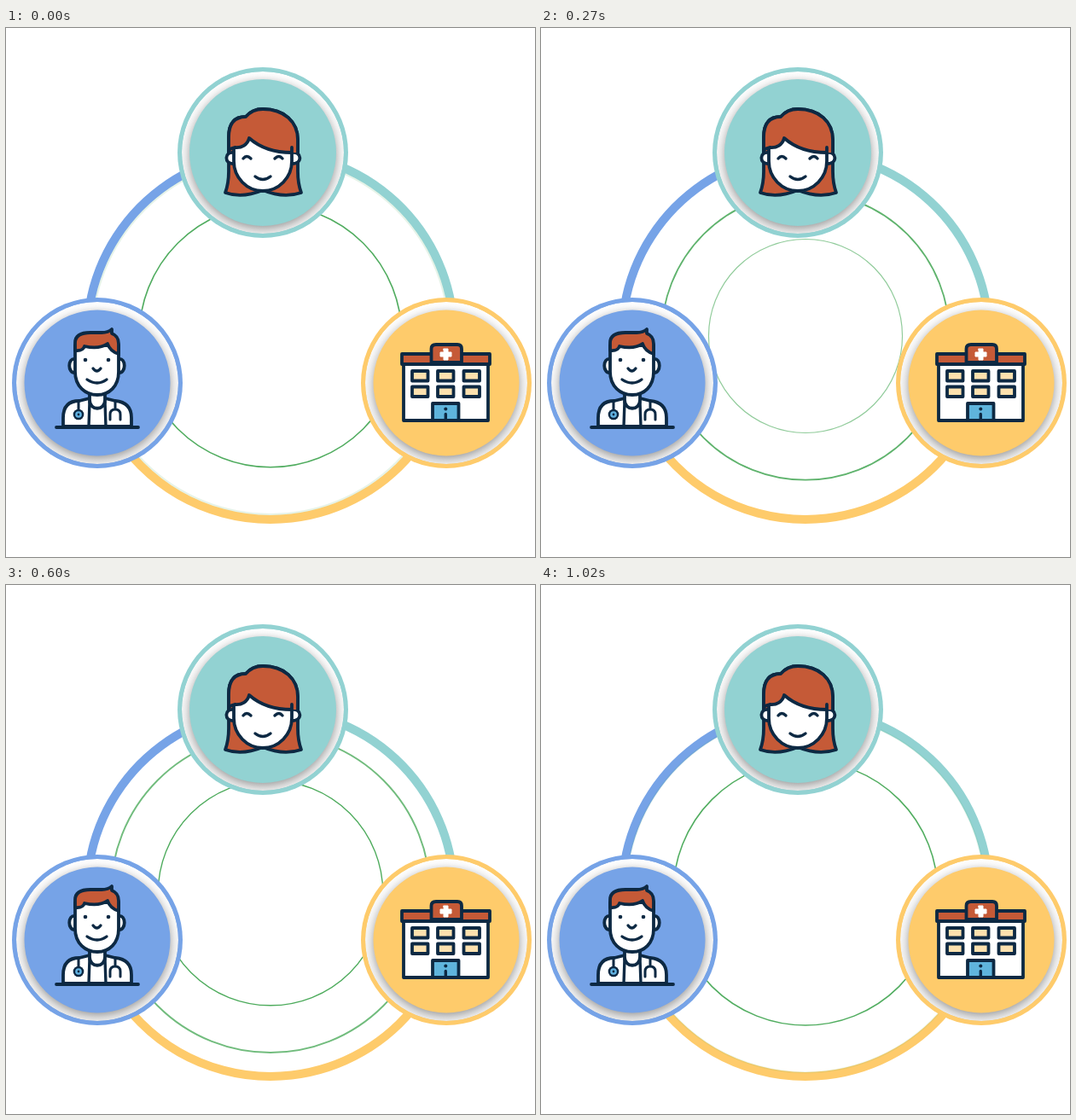
Animation, 620 px wide and 620 px high, one loop 1.05 s. Source, as an HTML page with a canvas:

```html
<!DOCTYPE html>
<html lang="en">
<head>
<meta charset="utf-8">
<title>Care circle</title>
<style>
html, body { margin: 0; width: 100%; height: 100%; overflow: hidden; background: #fff; }
canvas { display: block; width: 620px; height: 620px; }
</style>
</head>
<body>
<canvas id="stage" width="620" height="620"></canvas>
<script>
const SIZE = 620, LOOP = 1050, STEP = 30;
const CX = 310, CY = 361;
const BLUE = '#76a3e7', TEAL = '#92d2d2', YELLOW = '#fecb6b';
const NAVY = '#0d2943', RUST = '#c55a37', GREEN = '#4dab5c';
const ctx = document.getElementById('stage').getContext('2d');

function disc(g, x, y, r, fill) {
  g.beginPath();
  g.arc(x, y, r, 0, Math.PI * 2);
  g.fillStyle = fill;
  g.fill();
}

// Fills and outlines SVG path data.
function shape(g, d, fill, width = 3.8) {
  const p = new Path2D(d);
  if (fill) {
    g.fillStyle = fill;
    g.fill(p);
  }
  if (width) {
    g.lineWidth = width;
    g.stroke(p);
  }
}

function box(g, x, y, w, h, fill, width = 3.8) {
  shape(g, `M${x} ${y}h${w}v${h}h${-w}z`, fill, width);
}

function badge(g, x, y, r, color) {
  disc(g, x, y, 100, color);
  g.save();
  g.beginPath();
  g.arc(x, y, 95, 0, Math.PI * 2);
  g.clip();
  const rim = g.createLinearGradient(0, y - 95, 0, y + 95);
  rim.addColorStop(0, '#ffffff');
  rim.addColorStop(1, '#f1f1f1');
  disc(g, x, y, 95, rim);
  g.shadowColor = 'rgba(0,0,0,0.38)';
  g.shadowBlur = 11;
  g.shadowOffsetY = 3;
  disc(g, x, y, r, color);
  g.restore();
}

function woman(g) {
  shape(g, 'M261 140V128C261 112 268 104 281 104C287 97 294 95 301 95C326 95 342 110 342 131V168' +
    'Q342 182 346 193Q325 200 301 190Q277 200 257 193Q261 182 261 168Z', RUST);
  shape(g, 'M267 146C256 144 255 160 267 159M335 146C347 144 348 160 335 159', '#fff');
  shape(g, 'M267 138V156A34 35 0 0 0 335 156V140L300 122Z', '#fff');
  shape(g, 'M261 143V128C261 112 268 104 281 104C287 97 294 95 301 95C326 95 342 110 342 131V146' +
    'Q306 147 285 129C283 137 274 141 268 140Q264 141 261 143Z', RUST, 0);
  shape(g, 'M261 143Q264 141 268 140C276 141 283 137 285 129Q304 146 335 146V140');
  shape(g, 'M261 145V128C261 112 268 104 281 104C287 97 294 95 301 95C326 95 342 110 342 131V146');
  shape(g, 'M278 153Q282 148 287 153M315 153Q320 148 324 153M292 174Q301 181 310 174', null, 3.4);
}

function doctor(g) {
  shape(g, 'M67 467V457C67 442 75 437 86 437L98 434H116L128 437C140 438 147 444 147 457V467Z', '#fff');
  shape(g, 'M98 426V436C98 449 116 449 116 436V426', '#fff');
  shape(g, 'M98 438L97 467M116 438L117 467', null, 3.4);
  shape(g, 'M81 388C72 386 72 405 81 404M132 388C141 386 141 405 132 404', '#fff');
  shape(g, 'M81 372V403C81 420 93 430 107 430S132 420 132 403V372Z', '#fff');
  shape(g, 'M81 378V369C81 360 88 357 99 357H112Q120 357 124 353V358Q132 361 132 370V382' +
    'Q122 379 119 370Q109 377 92 373Q90 379 81 378Z', RUST);
  disc(g, 93, 389, 2.3, NAVY);
  disc(g, 120, 389, 2.3, NAVY);
  shape(g, 'M102 399Q106.5 405 111 399M95 412Q107 420 118 412', null, 3.3);
  shape(g, 'M85 438V447M128 438V447M122 459V453Q122 447 128 447T134 453V459', null, 3);
  disc(g, 85, 453, 6.3, NAVY);
  disc(g, 85, 453, 3.8, '#62b3e2');
  disc(g, 85, 453, 1.4, NAVY);
  shape(g, 'M59 468H155');
}

function hospital(g) {
  box(g, 466, 393, 99, 67, '#fff');
  box(g, 464, 382, 103, 12, RUST);
  shape(g, 'M498.5 392V376Q498.5 371 504 371H529Q534 371 534 376V392Z', RUST);
  shape(g, 'M513 376h5v4h4v5h-4v4h-5v-4h-4v-5h4z', '#fff', 0);
  g.save();
  g.strokeStyle = '#fff';
  shape(g, 'M513 376h5v4h4v5h-4v4h-5v-4h-4v-5h4z', null, 1);
  g.restore();
  for (const y of [402, 420.5])
    for (const x of [476, 506, 536.5]) box(g, x, y, 18.5, 11.5, '#fde1ae');
  box(g, 500, 440, 30.5, 20, '#5fb4dc');
  disc(g, 515.3, 446.5, 2, NAVY);
  shape(g, 'M515.3 452.5V459', null, 3.4);
}

function layer(paint) {
  const c = document.createElement('canvas');
  c.width = c.height = SIZE;
  const g = c.getContext('2d');
  g.lineJoin = g.lineCap = 'round';
  g.strokeStyle = NAVY;
  paint(g);
  return c;
}

const badges = layer(g => {
  badge(g, 301, 146, 86, TEAL);
  badge(g, 107, 416, 85.5, BLUE);
  badge(g, 516, 416, 85.5, YELLOW);
  woman(g);
  doctor(g);
  hospital(g);
});

const track = layer(g => {
  g.lineWidth = 10;
  g.lineCap = 'butt';
  // Joints between the arcs lie behind the badges.
  const arcs = [[BLUE, 165, 268], [TEAL, 268, 375], [YELLOW, 15, 165]];
  for (const [color, from, to] of arcs) {
    g.beginPath();
    g.arc(CX, CY, 215, from * Math.PI / 180, to * Math.PI / 180);
    g.strokeStyle = color;
    g.stroke();
  }
});

const ramp = (v, a, b) => Math.min(1, Math.max(0, (v - a) / (b - a)));

function ripple(r) {
  const alpha = ramp(r, 109.5, 116) * (1 - 0.25 * ramp(r, 150, 195)) * (1 - ramp(r, 192, 213));
  if (alpha <= 0) return;
  ctx.globalAlpha = alpha;
  ctx.strokeStyle = GREEN;
  ctx.lineWidth = r / 98;
  ctx.beginPath();
  ctx.arc(CX, CY, r, 0, Math.PI * 2);
  ctx.stroke();
  ctx.globalAlpha = 1;
}

const start = performance.now();

function draw(now) {
  const t = Math.floor(Math.max(0, now - start) % LOOP / STEP) * STEP;
  ctx.fillStyle = '#fff';
  ctx.fillRect(0, 0, SIZE, SIZE);
  ctx.drawImage(track, 0, 0);
  for (let i = 0; i < 3; i++) ripple(98.6 + 55.2 * i + 0.0553 * t);
  ctx.drawImage(badges, 0, 0);
  requestAnimationFrame(draw);
}

draw(start);
</script>
</body>
</html>
```
